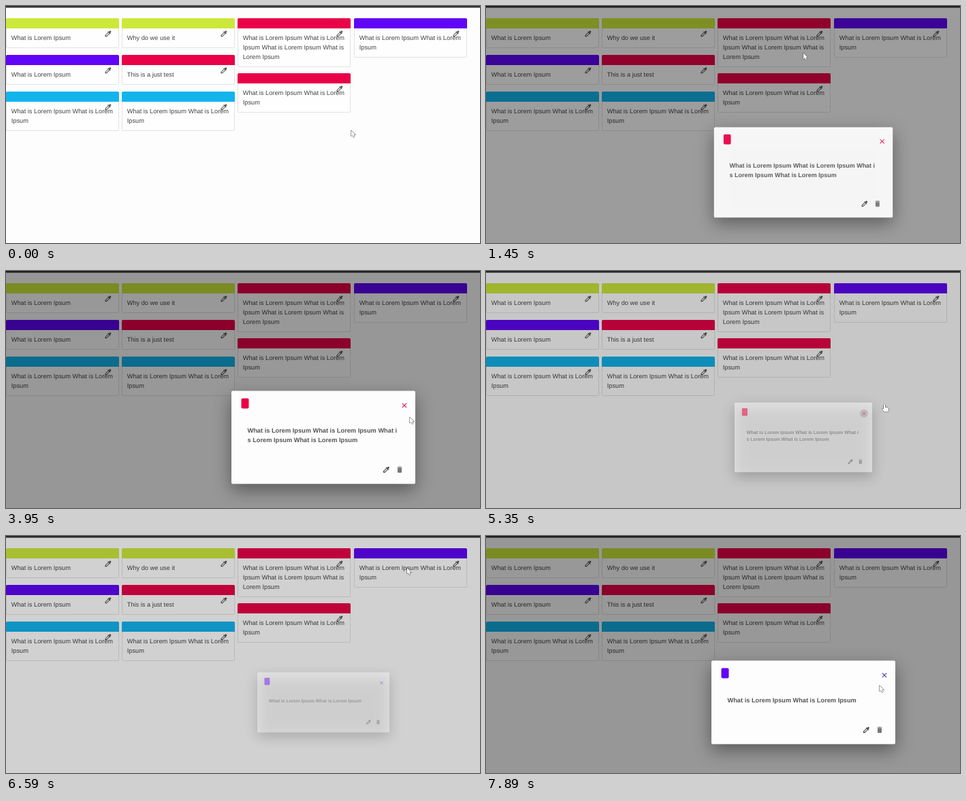
These frames come from a looping animation (696 by 349 pixels, 7.99 s). An HTML page with a canvas:

```html
<!DOCTYPE html>
<html lang="en">
<head>
<meta charset="utf-8">
<title>Note board</title>
<style>
html, body { margin: 0; height: 100%; overflow: hidden; background: #fdfdfd; }
canvas { display: block; }
</style>
</head>
<body>
<canvas width="696" height="349"></canvas>
<script>
const ctx = document.querySelector('canvas').getContext('2d');
const LOOP = 7990;
const LIME = '#cce83b', PURPLE = '#6005f5', RED = '#e90248', BLUE = '#12b4ec';
const FONT = '9.24px "Liberation Sans", Arial, sans-serif';

const phrase = 'What is Lorem Ipsum';
const twoLines = [phrase + ' What is Lorem', 'Ipsum'];
const card = (x, y, color, ...lines) => ({ x, y, color, lines, w: 165, h: 29 + 14 * lines.length });
const cards = [
  card(0, 18, LIME, phrase),
  card(0, 72, PURPLE, phrase),
  card(0, 126, BLUE, ...twoLines),
  card(170, 18, LIME, 'Why do we use it'),
  card(170, 72, RED, 'This is a just test'),
  card(170, 126, BLUE, ...twoLines),
  card(340, 18, RED, twoLines[0], 'Ipsum What is Lorem Ipsum What is', 'Lorem Ipsum'),
  card(340, 99, RED, ...twoLines),
  card(511, 18, PURPLE, ...twoLines)
];

// grow shapes how the scale follows the fade
const dialogs = [
  { open: 1165, close: 5210, grow: 1.2, shrink: 1.1, h: 137, color: RED, cross: RED,
    lines: [`${phrase} ${phrase} What i`, `s Lorem Ipsum ${phrase}`] },
  { open: 6460, close: Infinity, grow: 1, h: 123, color: '#6400fa', cross: '#3a30b4',
    lines: [`${phrase} ${phrase}`] }
];
const FADE = 300, CX = 466, CY = 245, DIALOG_W = 270;

// time, x, y of the pointer
const route = [
  [0, 507, 183], [250, 534, 184], [850, 466, 59], [1350, 466, 59], [1800, 467, 138],
  [2600, 467, 138], [3400, 593, 215], [4150, 593, 215], [4600, 585, 196], [5450, 585, 196],
  [5850, 589, 110], [6150, 589, 47], [6650, 589, 47], [7350, 578, 220], [LOOP, 578, 220]
];

const icons = {
  dropper: new Path2D('M20.7 5.6l-2.3-2.3c-.4-.4-1-.4-1.4 0l-3.1 3.1-2-1.9-1.4 1.4 1.4 1.4L3 16.2V21h4.8l8.9-8.9 1.4 1.4 1.4-1.4-1.9-1.9 3.1-3.1c.4-.4.4-1 0-1.5zM6.9 19L5 17.1l8.1-8.1 1.9 1.9z'),
  bin: new Path2D('M6 19c0 1.1.9 2 2 2h8c1.1 0 2-.9 2-2V7H6zM19 4h-3.5l-1-1h-5l-1 1H5v2h14z'),
  cross: new Path2D('M19 6.4L17.6 5 12 10.6 6.4 5 5 6.4 10.6 12 5 17.6 6.4 19 12 13.4 17.6 19 19 17.6 13.4 12z')
};
const pointers = {
  arrow: new Path2D('M0 0V9L2 7.2 3.4 10.3 4.9 9.6 3.6 6.6H6.2Z'),
  hand: new Path2D('M-1 .8Q0-.6 1 .8V4.5L5.4 5.4Q6.3 5.8 6.2 7L5.4 11.5H-.4L-3.4 7.2Q-3.2 5.8-1 7.2Z'),
  move: new Path2D('M0-6L2.3-3.2H.7V-.7H3.2V-2.3L6 0 3.2 2.3V.7H.7V3.2H2.3L0 6-2.3 3.2H-.7V.7H-3.2V2.3L-6 0-3.2-2.3V-.7H-.7V-3.2H-2.3Z')
};

const clamp = v => Math.min(1, Math.max(0, v));

function pointerAt(t) {
  const i = route.findIndex(k => k[0] > t);
  const [t0, x0, y0] = route[i - 1], [t1, x1, y1] = route[i];
  const u = (t - t0) / (t1 - t0), e = u * u * (3 - 2 * u);
  return { x: x0 + (x1 - x0) * e, y: y0 + (y1 - y0) * e };
}

function roundRect(x, y, w, h, r, color) {
  ctx.beginPath();
  ctx.roundRect(x, y, w, h, r);
  ctx.fillStyle = color;
  ctx.fill();
}

function drawIcon(name, x, y, color) {
  ctx.save();
  ctx.translate(x, y);
  ctx.scale(.5, .5);
  ctx.translate(-12, -12);
  ctx.fillStyle = color;
  ctx.fill(icons[name]);
  ctx.restore();
}

function drawLines(lines, x, y, color, weight = '') {
  ctx.font = `${weight} ${FONT}`;
  ctx.textRendering = 'geometricPrecision';
  ctx.fillStyle = color;
  lines.forEach((line, i) => ctx.fillText(line, x, y + 14 * i));
}

function drawCard({ x, y, w, h, color, lines }) {
  roundRect(x, y, w + 1, h + 1, 2, '#e2e2e2');
  roundRect(x + 1, y + 1, w - 1, h - 1, 1, '#fefefe');
  roundRect(x, y, w + 1, 15, [2, 2, 0, 0], color);
  drawLines(lines, x + 7.7, y + 32.3, '#444');
  drawIcon('dropper', x + 150, y + 22.8, '#555');
}

function drawDialog(d, p, closing, hover) {
  const s = .5 + .5 * p ** (closing ? d.shrink : d.grow);
  ctx.save();
  ctx.globalAlpha = p;
  ctx.translate(CX, CY);
  ctx.scale(s, s);
  ctx.translate(-DIALOG_W / 2, -d.h / 2);
  ctx.shadowColor = 'rgba(0,0,0,.42)';
  ctx.shadowBlur = 26 * s;
  ctx.shadowOffsetY = 9 * s;
  roundRect(0, 0, DIALOG_W, d.h, 2, '#fdfdfd');
  ctx.shadowColor = 'transparent';
  roundRect(14.5, 11, 11, 15, 2, d.color);
  if (hover) roundRect(246, 13.5, 16, 16, 8, 'rgba(0,0,0,.22)');
  drawIcon('cross', 254, 21.5, d.cross);
  drawLines(d.lines, 23.5, 61.7, '#555', 'bold');
  drawIcon('dropper', 227.5, d.h - 21, '#444');
  drawIcon('bin', 247, d.h - 21, '#777');
  ctx.restore();
}

function drawPointer(kind, { x, y }) {
  ctx.save();
  ctx.translate(x, y);
  ctx.lineJoin = 'round';
  const dark = kind === 'move';
  ctx.lineWidth = dark ? 1.4 : 1;
  ctx.strokeStyle = dark ? '#fff' : '#333';
  ctx.fillStyle = dark ? '#333' : '#fff';
  ctx.stroke(pointers[kind]);
  ctx.fill(pointers[kind]);
  ctx.restore();
}

function draw(t) {
  ctx.fillStyle = '#fdfdfd';
  ctx.fillRect(0, 0, 696, 349);
  ctx.fillStyle = '#333';
  ctx.fillRect(0, 0, 696, 2.5);
  cards.forEach(drawCard);

  const pos = pointerAt(t);
  const onCard = cards.some(c => pos.x > c.x && pos.x < c.x + c.w && pos.y > c.y && pos.y < c.y + c.h);
  let kind = onCard ? 'move' : 'arrow';
  for (const d of dialogs) {
    const p = clamp((t - d.open) / FADE) * clamp(1 - (t - d.close) / FADE);
    if (!p) continue;
    const crossY = CY - d.h / 2 + 21;
    const hover = Math.hypot(pos.x - 585, pos.y - crossY) < 9;
    if (hover) kind = 'hand';
    else if (p > .3) kind = 'arrow';
    ctx.fillStyle = `rgba(0,0,0,${.405 * p})`;
    ctx.fillRect(0, 0, 696, 349);
    drawDialog(d, p, t > d.close, hover);
  }
  drawPointer(kind, pos);
}

function tick() {
  draw(performance.now() % LOOP);
  requestAnimationFrame(tick);
}
tick();
</script>
</body>
</html>
```
